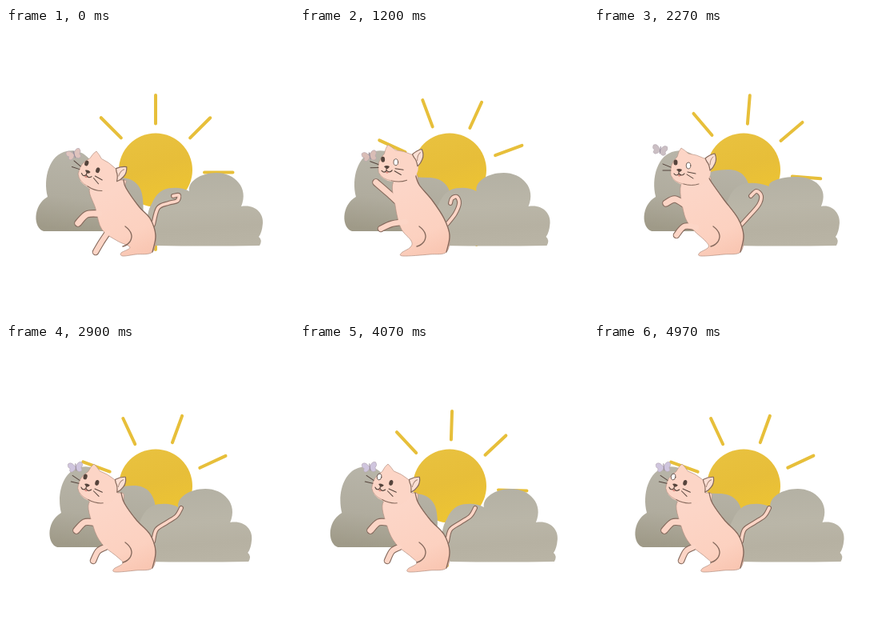
Recreate the animation shown at these times as an HTML page. Size 360 by 360 pixels, loop 5000 ms.

```html
<!DOCTYPE html>
<html lang="en">
<head>
<meta charset="utf-8">
<title>Cat, butterfly and sun</title>
<style>
  html, body { margin: 0; width: 100%; height: 100%; overflow: hidden; background: #fff; }
  svg { display: block; width: 100vw; height: 100vh; }
</style>
</head>
<body>
<svg viewBox="0 0 360 360">
  <defs>
    <linearGradient id="sunFill" x1="0" y1="0" x2="0.3" y2="1">
      <stop offset="0" stop-color="#e9c240"/>
      <stop offset="0.55" stop-color="#e7be39"/>
      <stop offset="1" stop-color="#edc433"/>
    </linearGradient>
    <linearGradient id="leftFill" gradientUnits="userSpaceOnUse" x1="100" y1="154" x2="86" y2="254">
      <stop offset="0" stop-color="#b8b5a9"/>
      <stop offset="0.6" stop-color="#b0ac9e"/>
      <stop offset="1" stop-color="#9f9a88"/>
    </linearGradient>
    <linearGradient id="rightFill" gradientUnits="userSpaceOnUse" x1="250" y1="182" x2="256" y2="273">
      <stop offset="0" stop-color="#b4b1a4"/>
      <stop offset="0.45" stop-color="#bab6a8"/>
      <stop offset="0.75" stop-color="#b6b1a2"/>
      <stop offset="1" stop-color="#b9b4a5"/>
    </linearGradient>
    <linearGradient id="fur" gradientUnits="userSpaceOnUse" x1="125" y1="195" x2="165" y2="285">
      <stop offset="0" stop-color="#fcd6c8"/>
      <stop offset="0.7" stop-color="#fcd1c0"/>
      <stop offset="1" stop-color="#f9c6b2"/>
    </linearGradient>
  </defs>
  <g id="rays" stroke="#e7bf3a" stroke-width="4" stroke-linecap="round"></g>
  <circle cx="187" cy="177.5" r="46" fill="url(#sunFill)"/>
  <path id="left" fill="url(#leftFill)"/>
  <path id="right" fill="url(#rightFill)"/>
  <g id="moth"></g>
  <g id="cat" stroke-linecap="round" stroke-linejoin="round"></g>
</svg>
<script>
const LOOP = 5000, INK = '#85695c', SKIN = '#fcd5c6', DARK = '#55443c';
const $ = id => document.getElementById(id);

// head: left ear tip and tilt; limbs and tail are centre lines
const POSES = {
  rest: {
    head: [113, 154, 18], foot: 143, back: [150, 200, 166, 223],
    chest: [120, 252, 112, 226, 106, 198],
    paw: [116, 232, 101, 233, 90, 244], leg: [127, 256, 119, 268, 112, 280],
    tail: [184, 246, 190, 225, 203, 219, 214, 216, 216, 209, 209, 210],
    moth: [85, 158, -14], wing: '#dfc3bd'
  },
  reach: {
    head: [110, 146, -2], foot: 126, back: [149, 196, 165, 215],
    chest: [126, 250, 119, 222, 117, 192],
    paw: [121, 216, 110, 206, 95, 193], leg: [132, 242, 114, 245, 101, 251],
    tail: [184, 245, 194, 232, 199, 219, 196, 211, 190, 213, 188, 219],
    moth: [87, 160, -10], wing: '#d9bdb6'
  },
  stand: {
    head: [109, 150, 0], foot: 131, back: [147, 193, 162, 214],
    chest: [122, 250, 112, 230, 110, 193],
    paw: [114, 221, 101, 214, 90, 219], leg: [128, 249, 113, 248, 103, 259],
    tail: [184, 246, 195, 234, 206, 221, 209, 210, 203, 204, 196, 210],
    moth: [82.5, 152.5, 12], wing: '#cbbfc4'
  },
  watch: {
    head: [110, 150, 13], foot: 134, back: [148, 199, 163, 220],
    chest: [120, 250, 109, 228, 105, 196],
    paw: [110, 223, 98, 223, 88, 233], leg: [124, 254, 115, 259, 109, 271],
    tail: [184, 247, 188, 232, 201, 223, 213, 215, 219, 205],
    moth: [87, 154, -4], wing: '#cfc5de'
  }
};

// time and cloud shift pairs
const LEFT_X = [[0, 0], [700, 10], [1330, 20], [1730, 26.5], [2050, 28], [2600, 21],
  [2900, 17], [3670, 6], [4050, 0], [4470, 6.5], [4970, 14], [5000, 14.4]];
const RIGHT_X = [[0, 0], [700, -6.5], [1330, -9], [1870, -13], [2600, -15], [2900, -13.8],
  [3200, -4], [3670, 1.2], [3900, 3], [4470, -4], [4970, -8.5], [5000, -8.7]];

function along(keys, t) {
  let i = 1;
  while (i < keys.length - 1 && keys[i][0] < t) i++;
  const [t0, a] = keys[i - 1], [t1, b] = keys[i];
  return a + (b - a) * (t - t0) / (t1 - t0);
}

// smooth curve through a flat list of points
function curve(p, closed) {
  const n = p.length / 2;
  const at = i => {
    const k = closed ? (i + n) % n : Math.max(0, Math.min(n - 1, i));
    return [p[2 * k], p[2 * k + 1]];
  };
  let d = 'M' + at(0);
  for (let i = 0; i < (closed ? n : n - 1); i++) {
    const [a, b, c, e] = [at(i - 1), at(i), at(i + 1), at(i + 2)];
    const k1 = b.map((v, j) => v + (c[j] - a[j]) / 6);
    const k2 = c.map((v, j) => v - (e[j] - b[j]) / 6);
    d += `C${k1} ${k2} ${c}`;
  }
  return d + (closed ? 'Z' : '');
}

const line = (d, w = 1.3, col = INK) =>
  `<path d="${d}" fill="none" stroke="${col}" stroke-width="${w}"/>`;

function eye(x, y, blank) {
  return blank
    ? `<ellipse cx="${x}" cy="${y}" rx="2.8" ry="4" fill="#fff" stroke="${DARK}" stroke-width=".8"/>`
    : `<ellipse cx="${x}" cy="${y}" rx="2.5" ry="3.5" fill="${DARK}"/>`;
}

function head([x, y, a], blank) {
  return `<g transform="translate(${x} ${y}) rotate(${a})">
    <path d="M-5 11Q-3 3 0 0Q5 3 9 7Q19 8 29 13Q35 8 42 7Q45 14 42 20Q40 25 37 28
      Q37 40 26 46Q14 51 3 46Q-9 44 -13 34Q-15 20 -5 11Z" fill="${SKIN}"/>
    ${line('M3 45Q-9 43 -13 34Q-15 20 -5 11Q-3 3 0 0Q5 3 9 7Q19 8 29 13', .6, '#b08f80')}
    ${line('M3 45Q13 48 22 45', 1)}
    <path d="M30 13Q36 8 42 7Q45 14 42 20Q40 25 36 28Q35 20 32 17Z" fill="#fbdfd4" stroke="${INK}" stroke-width="1.2"/>
    ${line('M40 11Q36 14 36 21', 1, '#a9887a')}
    ${eye(-7, 18, blank === 'left')}${eye(9, 22, blank === 'right')}
    <path d="M-6 27Q-3 25 1 27Q0 30 -3 30Z" fill="${DARK}"/>
    <path d="M-5 33Q-3 38 0 34Z" fill="#d98b80"/>
    ${line('M-3 30V32Q-6 36 -9 32M-3 32Q1 36 4 32', 1.2, DARK)}
    ${line('M-13 24L-23 20M-13 28L-23 28M8 30L18 32M7 33L15 38', 1, DARK)}
  </g>`;
}

function drawCat(p, blank) {
  const f = p.foot;
  const back = [p.head[0] + 34, p.head[1] + 36, ...p.back, 180, 238, 187, 259, 183, 280];
  const body = [...back, 162, 283, f + 3, 285, f + 1, 281, f + 12, 274, 139, 266, ...p.chest];
  const paw = curve(p.paw), leg = curve(p.leg), tail = curve(p.tail);
  $('cat').innerHTML =
    line(tail, 6) + line(tail, 3.8, SKIN) +
    line(paw, 9.6) + line(leg, 8.6) +
    `<path d="${curve(body, true)}" fill="url(#fur)" stroke="#b08f80" stroke-width=".7"/>` +
    line(curve(back)) +
    line(paw, 7.4, SKIN) + line(leg, 6.4, SKIN) +
    line('M149 248Q161 257 155 267Q151 272 146 273') +
    head(p.head, blank);
  const [mx, my, ma] = p.moth;
  $('moth').innerHTML = `<g transform="translate(${mx} ${my}) rotate(${ma}) scale(1.15)" stroke="#b3a6b0" stroke-width=".5">
    <path d="M0 0Q-4 -7 -8 -4Q-9 0 -6 1Q-8 5 -4 5Q-1 4 0 1Q2 6 5 5Q8 4 6 1Q9 -2 7 -5Q3 -7 0 0Z" fill="${p.wing}"/>
    <path d="M0 -4L.5 4" stroke="#978a9b" stroke-width=".9"/></g>`;
}

function drawClouds(t) {
  const puffy = t % 485 >= 270 && t % 485 < 410;
  const lift = t > 1400 && t < 3200 ? 10 : 0;
  const top = 187 - lift;
  $('left').setAttribute('d', `M47 254C34 250 33 222 52 211C46 188 54 158 76 154
    C94 150 109 163 113 183Q124 ${top} 142 ${top}C160 ${top} 170 ${top + 10} 171 214
    Q174 238 162 254Z`);
  $('left').setAttribute('transform', `translate(${along(LEFT_X, t)} 0)`);
  const [s, y, low] = puffy ? [4, 186, 194] : [0, 181, 200];
  $('right').setAttribute('d', `M187 272C174 260 174 232 182 ${low + 20}
    Q190 ${low} 208 ${low}Q219 ${low - 1} ${229 + s} ${low + 4}
    C${227 + s} 192 ${243 + s} ${y} ${263 + s} ${y}C${286 + s} ${y} ${304 + s} 200 ${294 + s} 223
    C311 220 322 231 321 244Q320 256 316 261Q321 265 317 272Q250 273 187 272Z`);
  $('right').setAttribute('transform', `translate(${along(RIGHT_X, t)} 0)`);
}

function poseAt(t) {
  const u = t % 510;
  if (t < 170 || u < 80) return 'rest';
  return u < 190 ? 'reach' : u < 340 ? 'stand' : 'watch';
}

function blankEye(t, pose) {
  if (pose === 'rest') return '';
  return t < 1200 ? 'left' : t < 2400 ? 'right' : t < 3300 ? '' : 'left';
}

// a steady turn with a slight sway
const turn = t => t * 0.0221 - 2 * Math.sin(2 * Math.PI * t / LOOP);

for (let a = 0; a < 360; a += 45)
  $('rays').innerHTML += `<path d="M187 119.5V84" transform="rotate(${a} 187 180.5)"/>`;

let shown = '';
function draw(t) {
  $('rays').setAttribute('transform', `rotate(${turn(t)} 187 180.5)`);
  drawClouds(t);
  const pose = poseAt(t), blank = blankEye(t, pose);
  if (shown !== pose + blank) {
    shown = pose + blank;
    drawCat(POSES[pose], blank);
  }
}

const start = performance.now();
function tick() {
  draw((performance.now() - start) % LOOP);
  requestAnimationFrame(tick);
}
tick();
</script>
</body>
</html>
```
